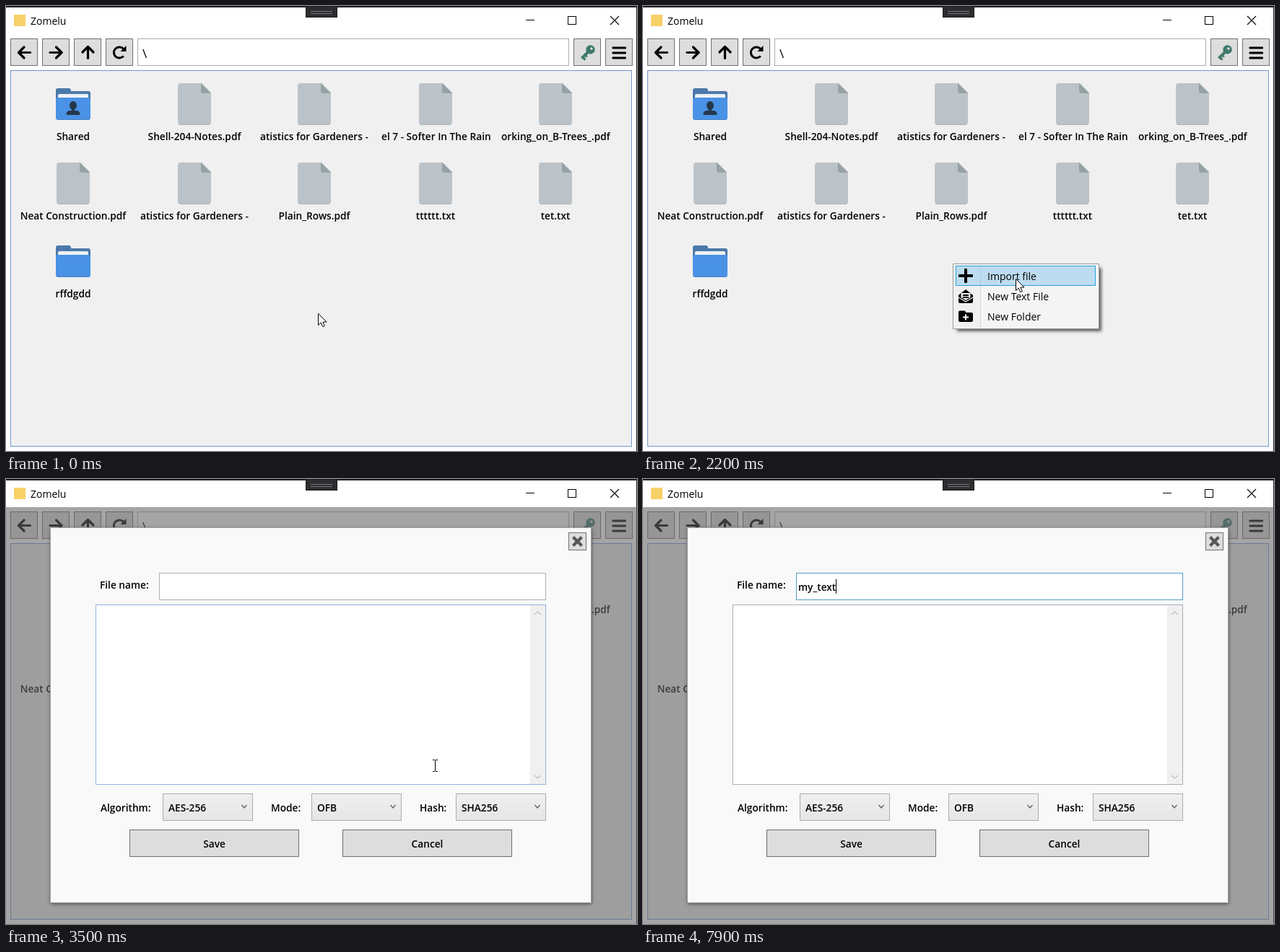
An HTML page with a canvas for the animation above (8 s loop, 874 by 617 pixels).

```html
<!DOCTYPE html>
<html lang="en">
<head>
<meta charset="utf-8">
<title>File manager</title>
<style>
html, body { margin: 0; width: 100%; height: 100%; overflow: hidden; background: #fff; }
canvas { display: block; }
</style>
</head>
<body>
<canvas id="stage" width="874" height="617"></canvas>
<script>
const ctx = document.getElementById('stage').getContext('2d');
const LOOP = 8000, MENU_AT = 900, DIALOG_AT = 3400, FOCUS_AT = 5200;
const SANS = '"Open Sans", "Noto Sans", sans-serif';
const REGULAR = `400 14px ${SANS}`, STRONG = `600 13.7px ${SANS}`;
const COLUMNS = [93, 261, 427, 595, 761];

// Each key: time, x, y
const POINTER = [[0, 432, 426], [400, 432, 426], [800, 429, 357], [950, 429, 357],
  [1350, 516, 378], [2200, 516, 378], [2800, 592, 396], [3400, 592, 396]];
const BEAM = [[3400, 594, 397], [3700, 594, 397], [4600, 310, 146], [8000, 310, 146]];
const KEYS = [[6000, 'm'], [6200, 'my'], [6500, 'my_'], [7300, 'my_t'],
  [7400, 'my_te'], [7600, 'my_tex'], [7800, 'my_text']];

const FILES = [
  ['shared', 'Shared'], ['file', 'Shell-204-Notes.pdf'],
  ['file', 'atistics for Gardeners -', true], ['file', 'el 7 - Softer In The Rain', true],
  ['file', 'orking_on_B-Trees_.pdf', true], ['file', 'Neat Construction.pdf'],
  ['file', 'atistics for Gardeners -', true], ['file', 'Plain_Rows.pdf'],
  ['file', 'tttttt.txt'], ['file', 'tet.txt'], ['folder', 'rffdgdd']
];

function fill(color, x, y, w, h) {
  ctx.fillStyle = color;
  ctx.fillRect(x, y, w, h);
}

function box(x, y, w, h, color, border) {
  fill(color, x, y, w, h);
  ctx.strokeStyle = border;
  ctx.lineWidth = 1;
  ctx.strokeRect(x + .5, y + .5, w - 1, h - 1);
}

function rounded(color, x, y, w, h, r) {
  ctx.fillStyle = color;
  ctx.beginPath();
  ctx.roundRect(x, y, w, h, r);
  ctx.fill();
}

function line(points, width = 1, color = '#000', cap = 'butt') {
  ctx.strokeStyle = color;
  ctx.lineWidth = width;
  ctx.lineCap = cap;
  ctx.lineJoin = cap === 'round' ? 'round' : 'miter';
  ctx.beginPath();
  points.forEach(([x, y]) => ctx.lineTo(x, y));
  ctx.stroke();
}

function polygon(points, color) {
  ctx.fillStyle = color;
  ctx.beginPath();
  points.forEach(([x, y]) => ctx.lineTo(x, y));
  ctx.closePath();
  ctx.fill();
}

function disc(color, x, y, r) {
  ctx.fillStyle = color;
  ctx.beginPath();
  ctx.arc(x, y, r, 0, Math.PI * 2);
  ctx.fill();
}

function text(value, x, y, font = STRONG, align = 'left', color = '#000') {
  ctx.font = font;
  ctx.textAlign = align;
  ctx.fillStyle = color;
  ctx.fillText(value, x, y);
}

function at(x, y, draw, angle = 0) {
  ctx.save();
  ctx.translate(x, y);
  ctx.rotate(angle);
  draw();
  ctx.restore();
}

function along(path, t) {
  const next = path.findIndex(key => key[0] > t);
  if (next < 0) return path[path.length - 1].slice(1);
  if (next === 0) return path[0].slice(1);
  const [t0, x0, y0] = path[next - 1], [t1, x1, y1] = path[next];
  const p = (t - t0) / (t1 - t0), e = p * p * (3 - 2 * p);
  return [x0 + (x1 - x0) * e, y0 + (y1 - y0) * e];
}

function titleBar() {
  fill('#fff', 0, 0, 874, 617);
  fill('#202020', 0, 0, 874, 2);
  fill('#222', 873, 0, 1, 617);
  fill('#f7d168', 11, 12, 16, 16);
  text('Zomelu', 34, 26, REGULAR);
  box(415, 0, 44, 16, '#2d2d30', '#1d1d20');
  fill('#77777b', 422, 7, 30, 1);
  fill('#77777b', 422, 10, 30, 1);
  fill('#000', 720, 19, 12, 1);
  ctx.strokeStyle = '#000';
  ctx.lineWidth = 1;
  ctx.strokeRect(778.5, 14.5, 11, 11);
  line([[837, 14], [849, 26]], 1.1);
  line([[849, 14], [837, 26]], 1.1);
}

function arrow() {
  line([[8, 0], [-8, 0]], 3.2, '#000', 'round');
  line([[-.5, -7.5], [-8, 0], [-.5, 7.5]], 3.2, '#000', 'round');
}

function reload() {
  ctx.strokeStyle = '#000';
  ctx.lineWidth = 3;
  ctx.beginPath();
  ctx.arc(0, 0, 7.6, .7, Math.PI * 2 - .6);
  ctx.stroke();
  polygon([[9.5, -9.5], [9.5, -1.5], [1.5, -1.5]], '#000');
}

function keyIcon() {
  line([[1, 0], [-12, 0]], 4, '#3f796d');
  line([[-10, 0], [-10, 5]], 3, '#3f796d');
  line([[-5.5, 0], [-5.5, 4]], 2.5, '#3f796d');
  disc('#3f796d', 5, 0, 6.2);
  disc('#ddd', 7, 0, 1.7);
}

function toolbar() {
  for (const x of [6, 50, 94, 138, 786, 830]) box(x, 45, 38, 38, '#ddd', '#707070');
  at(25.5, 64.5, arrow);
  at(69, 64.5, arrow, Math.PI);
  at(113.5, 64.5, arrow, Math.PI / 2);
  at(157, 64.5, reload);
  box(182, 45, 598, 38, '#fff', '#abadb3');
  text('\\', 189, 72, `400 17px ${SANS}`);
  at(806, 64, keyIcon, -Math.PI / 4);
  for (const y of [57, 64, 71]) rounded('#000', 839.5, y - .5, 19.5, 3, 1);
}

function fileIcon(x, y) {
  rounded('#bcc3c8', x - 23, y, 46, 58, 4);
  polygon([[x + 9, y - 1], [x + 24, y - 1], [x + 24, y + 14]], '#f0f0f0');
  polygon([[x + 9, y], [x + 23, y + 14], [x + 11, y + 14], [x + 9, y + 12]], '#95a2a3');
  fill('#a9b1b5', x - 21, y + 57, 42, 1);
}

function folderIcon(x, y, shared) {
  rounded('#4c79aa', x - 24, y, 21, 18, 3);
  rounded('#4c79aa', x - 24, y + 4, 48, 20, 3);
  rounded('#eef1f4', x - 21, y + 8, 42, 12, 2);
  rounded('#4a92e5', x - 24, y + 13, 48, 31, 3);
  fill('#4780c6', x - 22, y + 43, 44, 1);
  if (!shared) return;
  const ink = '#24374b';
  ctx.fillStyle = ink;
  ctx.beginPath();
  ctx.ellipse(x, y + 24, 5, 6, 0, 0, Math.PI * 2);
  ctx.fill();
  fill(ink, x - 2, y + 28, 4, 4);
  rounded(ink, x - 9.5, y + 31, 19, 6, [5, 5, 1, 1]);
}

function fileList() {
  box(6, 89, 861, 522, '#f0f0f0', '#7096cf');
  FILES.forEach(([kind, label, clipped], i) => {
    const row = Math.floor(i / 5), x = COLUMNS[i % 5];
    if (kind === 'file') fileIcon(x, 107 + row * 110);
    else folderIcon(x, 114 + row * 109, kind === 'shared');
    ctx.save();
    ctx.beginPath();
    ctx.rect(x - 76, 165 + row * 109, 152, 30);
    ctx.clip();
    const y = 186 + [0, 110, 218][row];
    if (clipped) text(label, x - 75, y);
    else text(label, x, y, STRONG, 'center');
    ctx.restore();
  });
}

function letterIcon() {
  rounded('#000', -10, -3, 20, 12, 2);
  polygon([[-10, -2], [0, -10], [10, -2], [10, 4], [-10, 4]], '#000');
  polygon([[-6.5, -5], [6.5, -5], [6.5, 1], [0, 5], [-6.5, 1]], '#f0f0f0');
  fill('#000', -4, -3, 8, 2);
  fill('#000', -4, 0, 8, 2);
  line([[-10, 1], [0, 7], [10, 1]], 1.2, '#f0f0f0');
}

function newFolderIcon() {
  rounded('#000', -10, -8, 10, 8, 2);
  rounded('#000', -10, -5.5, 20, 13, 2);
  fill('#fff', -4, 0, 8, 2);
  fill('#fff', -1, -3, 2, 8);
}

function menu([, pointerY]) {
  ctx.save();
  ctx.shadowColor = 'rgba(0,0,0,.6)';
  ctx.shadowBlur = 4;
  ctx.shadowOffsetX = ctx.shadowOffsetY = 3;
  fill('#f5f5f5', 432, 360, 200, 88);
  ctx.restore();
  box(429, 357, 203, 91, '#f5f5f5', '#999');
  fill('#f0f0f0', 432, 360, 36, 85);
  fill('#d7d7d7', 467, 360, 1, 85);
  const row = pointerY < 388 ? 0 : pointerY < 416 ? 1 : 2;
  if (pointerY > 360) {
    box(433, 360 + row * 28, 194, 28, '#bedcf0', '#26a0da');
    fill('#abcde3', 467, 361 + row * 28, 1, 26);
  }
  rounded('#000', 437, 372, 20, 4, 1);
  rounded('#000', 445, 364, 4, 20, 1);
  at(447, 403, letterIcon);
  at(447, 430.5, newFolderIcon);
  ['Import file', 'New Text File', 'New Folder'].forEach((label, i) =>
    text(label, 477, 380 + i * 28, REGULAR));
}

function chevron(x, y, size, color, up = 1) {
  line([[x - size, y - 2 * up], [x, y + 2 * up], [x + size, y - 2 * up]], 1.3, color);
}

function combo(x, label, value, labelX) {
  text(label, labelX, 461);
  const shade = ctx.createLinearGradient(0, 436, 0, 474);
  shade.addColorStop(0, '#f0f0f0');
  shade.addColorStop(1, '#e5e5e5');
  box(x, 436, 125, 38, shade, '#acacac');
  text(value, x + 8, 461);
  chevron(x + 113, 454, 3.5, '#606060');
}

function dialog(t, [, beamY]) {
  fill('rgba(100,100,100,.58)', 0, 39, 874, 578);
  ctx.save();
  ctx.shadowColor = 'rgba(0,0,0,.55)';
  ctx.shadowBlur = 5;
  ctx.shadowOffsetY = 1;
  fill('#f9f9f9', 62, 68, 749, 520);
  ctx.restore();
  box(61, 67, 750, 521, '#f9f9f9', '#a0a0a0');

  box(779, 74, 25, 25, '#ddd', '#707070');
  line([[785.5, 80.5], [797.5, 92.5]], 4, '#555');
  line([[797.5, 80.5], [785.5, 92.5]], 4, '#555');

  const focused = t >= FOCUS_AT;
  const nameBorder = focused ? '#569dc5' : beamY < 168 ? '#7eb4dc' : '#abadb3';
  text('File name:', 130, 152);
  box(212, 130, 536, 38, '#fff', nameBorder);
  box(124, 174, 624, 250, '#fff', beamY >= 174 ? '#8bb3dc' : '#abadb3');
  fill('#f0f0f0', 726, 175, 21, 248);
  chevron(736.5, 186, 4.5, '#bfbfbf', -1);
  chevron(736.5, 413, 4.5, '#bfbfbf');

  combo(217, 'Algorithm:', 'AES-256', 131);
  combo(423, 'Mode:', 'OFB', 367);
  combo(623, 'Hash:', 'SHA256', 573);
  for (const [x, label] of [[171, 'Save'], [466, 'Cancel']]) {
    box(x, 486, 235, 38, '#ddd', '#707070');
    text(label, x + 117.5, 511, STRONG, 'center');
  }
  if (focused) typing(t);
}

function typing(t) {
  const [since, value] = KEYS.filter(key => key[0] <= t).pop() || [FOCUS_AT, ''];
  text(value, 215, 155);
  if ((t - since) % 1000 < 500) {
    fill('#000', Math.round(215 + ctx.measureText(value).width), 139, 1, 20);
  }
}

function arrowPointer([x, y]) {
  const shape = [[0, 0], [0, 16], [3.7, 12.6], [6.3, 18.2], [8.8, 17], [6.3, 11.6], [11.5, 11.5]];
  at(Math.round(x) + .5, Math.round(y) + .5, () => {
    polygon(shape, '#fff');
    line([...shape, shape[0]]);
  });
}

function beamPointer([x, y]) {
  at(Math.round(x), Math.round(y), () => {
    fill('#000', 0, -7, 1, 15);
    for (const edge of [-8, 8]) {
      fill('#000', -3, edge, 3, 1);
      fill('#000', 1, edge, 3, 1);
    }
  });
}

function render(now) {
  const t = Math.floor((now % LOOP) / 100) * 100;
  const pointer = along(POINTER, t), beam = along(BEAM, t);
  titleBar();
  toolbar();
  fileList();
  if (t < DIALOG_AT) {
    if (t >= MENU_AT) menu(pointer);
    arrowPointer(pointer);
  } else {
    dialog(t, beam);
    if (t < KEYS[0][0]) beamPointer(beam);
  }
}

const start = performance.now();
function tick() {
  render(performance.now() - start);
  requestAnimationFrame(tick);
}
tick();
</script>
</body>
</html>
```
